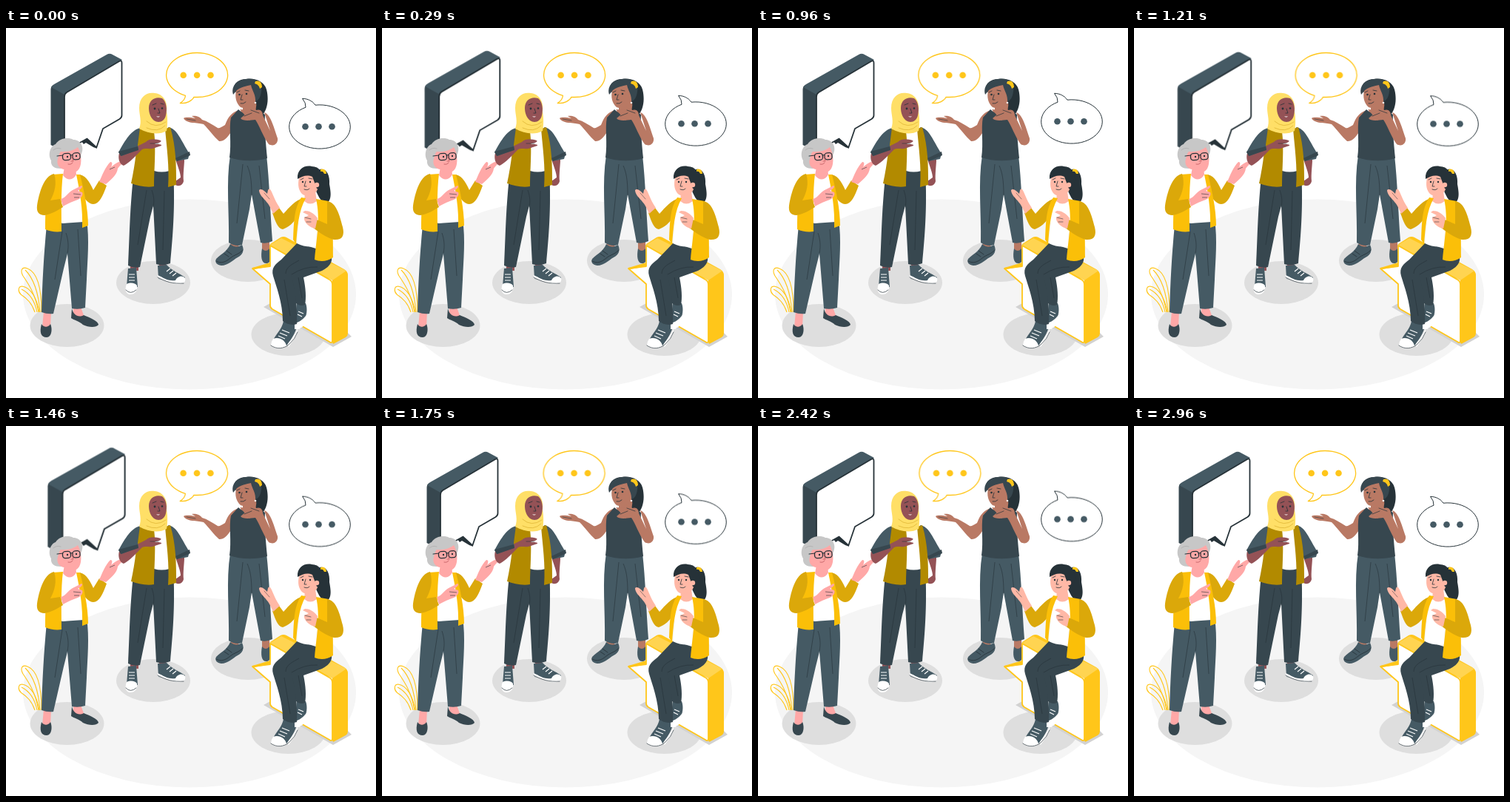
An HTML page that plays this animation: 500x500 px, repeating every 3 s.

```html
<!DOCTYPE html>
<html lang="en">
<head>
<meta charset="utf-8">
<title>Four women talking</title>
<style>
html, body { margin: 0; width: 100%; height: 100%; overflow: hidden; background: #fff; }
svg { display: block; width: 100%; height: 100%; }
.ink { fill: #263238; }
.navy { fill: #37474f; }
.slate { fill: #455a64; }
.sun { fill: #ffc61a; }
.amber { fill: #fbbf08; }
.gold { fill: #dba80a; }
.olive { fill: #b28a00; }
.white { fill: #fff; }
.pink { fill: #ffa8a7; }
.peach { fill: #ffb8a6; }
.umber { fill: #945256; }
.tan { fill: #b97964; }
.floor { fill: #f5f5f5; }
.shade { fill: #dedede; }
.line { fill: none; stroke: #263238; stroke-width: 1; stroke-linecap: round; stroke-linejoin: round; }
.lace { fill: none; stroke: #fff; stroke-width: 1.2; }
.fold { fill: none; stroke: #263238; stroke-width: .8; opacity: .75; }
.rim { fill: #fff; stroke: #ffc61a; stroke-width: 1.3; stroke-linejoin: round; }

.pulse { transform-origin: 109px 98.5px; animation: pulse 3s linear infinite; }
.shake { animation: shake 1.5s linear infinite; }
.float { animation: float 1.5s linear infinite; }
@keyframes pulse {
  0%, 25%, 35%, 59%, 100% { transform: scale(1); }
  16.67% { transform: scale(1.1); }
  50% { transform: scale(1.09); }
}
@keyframes shake {
  0%, 100% { transform: translateX(0); }
  10%, 90% { transform: translateX(-1px); }
  20%, 80% { transform: translateX(2px); }
  30%, 50%, 70% { transform: translateX(-4px); }
  40%, 60% { transform: translateX(4px); }
}
@keyframes float {
  0%, 100% { transform: translateY(0); }
  50% { transform: translateY(-10px); }
}
</style>
</head>
<body>
<svg viewBox="0 0 500 500">
  <ellipse class="floor" cx="248" cy="360" rx="225" ry="128.500"/>
  <g class="shade">
    <ellipse cx="82.500" cy="402" rx="50" ry="29"/>
    <ellipse cx="199" cy="344" rx="50" ry="29"/>
    <ellipse cx="327" cy="314.500" rx="50" ry="28.500"/>
    <ellipse cx="381.500" cy="414" rx="50" ry="29"/>
  </g>

  <!-- plant -->
  <g class="rim" style="fill:none;stroke-width:1.1">
    <path d="M48 384C48 360 45 331 29 325C21 322 19 328 23 335C31 347 39 358 44 384M26 327C38 339 44 359 46 384"/>
    <path d="M45 384C42 366 34 351 22 349C16 349 16 356 20 360C29 366 35 372 39 384M21 353C33 359 39 369 42 384"/>
  </g>

  <!-- big speech bubble -->
  <g class="pulse">
    <path class="navy" d="M60.500 83Q60.500 79 64 77L79 87V168L60.500 158Z"/>
    <path class="slate" d="M61 80Q62 78 65 76L136 36Q140 33.500 144 36L157 43L79 90Z"/>
    <path class="ink" d="M102 153L110 149L123 158L122 162.500L118 161L108 155L105 157Z"/>
    <path class="white" d="M79 93Q79 89 82 87L153 45Q156.500 43 156.500 47V118Q156.500 121 153.500 123L131 136L122.300 161.500L109.500 149.500L82 165Q79 167 79 163Z" stroke="#263238" stroke-width="1.800"/>
  </g>

  <!-- yellow round bubble -->
  <g class="shake">
    <path class="rim" d="M253.900 93.350C252 98 244 102.500 235.300 101.500Q242 97.500 242.500 91.300A41.500 30 0 1 1 253.900 93.350Z"/>
    <g class="sun"><circle cx="239.700" cy="63.800" r="4.300"/><circle cx="258.100" cy="63.800" r="4.300"/><circle cx="276.500" cy="63.800" r="4.300"/></g>
  </g>

  <!-- dark round bubble -->
  <g class="float">
    <path class="white" d="M405 107.200Q405.500 101 400.500 95.300C408 95.500 414 98.500 418 104.200A41.300 29.600 0 1 1 405 107.200Z" stroke="#263238"/>
    <g class="slate"><circle cx="404.500" cy="133.300" r="4.300"/><circle cx="422.500" cy="133.300" r="4.300"/><circle cx="440.500" cy="133.300" r="4.300"/></g>
  </g>

  <!-- older woman -->
  <g>
    <path class="pink" d="M51 382H61L60 405H49ZM91 377H101L106 391H91Z"/>
    <path class="navy" d="M48 400C51 405 57 405 60 400C63 406 62 418 55 418C47 418 45 411 48 400ZM89 379C91 388 98 392 105 388C112 391 125 396 125 401C122 405 112 405 104 401C99 396 92 395 88 392Z"/>
    <path class="slate" d="M55 266L109 260C113 285 110 315 109 340L107 378Q98 381 89 379L83 305L78 325L64 386Q56 387 48 384C49 346 51 307 55 266Z"/>
    <path class="fold" d="M83 304C85 294 84 286 81 277M76 275L66 340M97 272L101 335"/>
    <path class="white" d="M74 200C83 205 93 204 99 198L105 262L76 264Z"/>
    <path class="pink" d="M79 188L77 199C83 207 91 206 95 198L94 188Z"/>
    <path class="gold" d="M97 198C107 198 112 206 118 219L126 206L136 213C131 227 126 238 118 238C112 238 105 230 102 224Z"/>
    <path class="pink" d="M126 208C130 199 134 188 141 181C145 181 143 186 142 188C147 184 152 180 156 181C158 183 153 187 151 190C150 198 144 203 135 211Z"/>
    <path class="fold" d="M140 191L147 188"/>
    <path class="amber" d="M63 198L77 197C74 220 75 250 75 275C68 276 59 275 53 272C53 246 54 224 59 210ZM95 198L100 198C105 218 111 244 111 267L103 270C104 245 100 222 95 198Z"/>
    <path class="gold" d="M65 197C51 200 45 222 42 240C41 248 44 253 52 253C62 251 69 247 77 242L73 231L60 233C66 222 69 210 65 197Z"/>
    <path class="pink" d="M74 231C81 230 84 221 92 218L102 213C105 214 101 218 97 220L103 222C105 226 101 230 97 232C91 234 84 237 77 241Z"/>
    <path class="fold" d="M91 224L101 225M92 229L99 229"/>
    <path d="M61 179C56 171 60 159 67 157C72 149 84 147 91 151C101 151 106 161 102 170L98 178L74 190C66 190 60 187 61 179Z" fill="#c7c7c7"/>
    <path class="pink" d="M70 177C71 173 72 169 74 167C84 168 92 165 97 161C102 169 103 183 99 190C95 197 86 197 80 191C75 192 67 186 70 177Z"/>
    <path class="line" d="M69 173L77 172M87 172L90 171.500" stroke-width="1.500"/>
    <rect class="line" x="76.500" y="169.500" width="11" height="9" rx="3.500" transform="rotate(-4 82 174)" style="stroke-width:1.300"/>
    <rect class="line" x="90" y="168.800" width="10" height="9" rx="3.500" transform="rotate(-4 95 173)" style="stroke-width:1.300"/>
    <g class="ink"><circle cx="83" cy="174" r="1.200"/><circle cx="95" cy="173" r="1.200"/></g>
    <path class="line" d="M84 184Q88 185 90 182M89 173L91 180L88 180" style="stroke:#b9565c;stroke-width:.8"/>
    <path class="line" d="M64 165Q68 161 74 163" style="stroke:#a9a9a9;stroke-width:.7"/>
  </g>

  <!-- woman with headscarf -->
  <g>
    <path class="umber" d="M168 318H179V328H168ZM207 316H216V324H207Z"/>
    <path class="slate" d="M165 325L176 324L178 350L163 349ZM205 321L217 320C224 328 235 332 242 337L240 343L206 339Z"/>
    <path class="white" d="M163 346C169 343 175 345 177 348C178 356 174 360 168 360C162 360 160 353 163 346ZM205 334C214 338 222 344 229 341C231 336 238 333 242 338C244 345 236 347 230 346C221 344 212 340 205 338Z"/>
    <path class="lace" d="M166 333H174M166 337H174M166 341H174M217 329L222 325M221 332L226 328M225 335L230 331"/>
    <path class="line" d="M162 354Q168 361 176 354M205 337C216 343 226 346 240 345" style="stroke-width:.7"/>
    <path class="navy" d="M173 192L226 192C229 244 225 284 222 318Q212 322 203 319L199 240L195 255L181 323Q173 325 165 321C167 283 167 245 173 192Z"/>
    <path class="fold" d="M199 242C201 232 199 225 197 219M190 219L178 293M214 220L212 300"/>
    <path class="umber" d="M229 177C232 187 236 196 236 202L229 207L229 212C234 215 239 212 240 207C239 198 241 185 241 178Z"/>
    <path class="slate" d="M219 134C231 135 237 153 248 170L246 177L230 180L223 160Z"/>
    <path class="navy" d="M229 176L248 167L249 172L231 180Z"/>
    <path class="white" d="M195 138L218 137L221 193Q210 196 200 193Z"/>
    <path class="olive" d="M179 136L200 139C203 164 200 191 200 214C190 216 178 213 169 210C175 183 177 159 179 136ZM215 136L222 134C230 161 230 187 230 212L219 215C221 187 217 161 215 136Z"/>
    <path class="umber" d="M153 169L175 161L189 154C194 149 203 150 209 152C212 154 203 156 200 157C206 157 211 157 210 159L198 163C192 164 188 162 184 164C176 172 167 182 159 186C153 184 151 176 153 169Z"/>
    <path class="slate" d="M181 135C167 139 159 156 152 168L156 173L179 164L178 158Z"/>
    <path class="navy" d="M152 167L178 160L179 165L155 173Z"/>
    <path class="line" d="M195 156L206 156" style="stroke-width:.6"/>
    <path d="M180 108C180 93 190 86 201 88C212 89 219 99 217 113C219 124 218 135 217 139C207 145 192 143 180 136C184 126 180 118 180 108Z" fill="#ffdf67"/>
    <path class="umber" d="M193 108C193 97 202 92 211 95C217 100 218 110 216 118C214 127 206 129 200 125C195 121 193 114 193 108Z"/>
    <path class="line" d="M190 126Q202 137 216 127M190 135Q205 142 215 132" style="stroke:#dfb736;stroke-width:.8"/>
    <g class="ink"><circle cx="201" cy="109" r="1.400"/><circle cx="211" cy="108.500" r="1.300"/></g>
    <path class="line" d="M198 104L203 102M209 102L213 103M206 109L208 115L205 115" style="stroke-width:.8"/>
    <path d="M203 119.500Q206 121.500 208 119.500Z" fill="#fff"/>
  </g>

  <!-- woman with raised palm -->
  <g>
    <path class="tan" d="M304 288H315L314 299H303ZM346 286H356V303H346Z"/>
    <path class="slate" d="M303 292C309 297 314 296 319 293C323 301 319 307 313 310C306 314 300 321 291 321C284 320 282 316 284 312C291 305 299 302 303 292ZM346 298C349 302 353 302 356 298C359 309 358 317 353 318C345 319 344 309 346 298Z"/>
    <path class="line" d="M284 315C291 319 297 316 303 311C309 306 315 306 320 300M298 301L305 306M295 305L301 309" style="stroke-width:.8"/>
    <path class="slate" d="M303 172L352 172C356 207 357 248 360 288Q352 292 344 290L332 225L329 245L319 293Q310 296 301 290C302 250 297 209 303 172Z"/>
    <path class="fold" d="M332 226C332 205 330 195 326 186M320 184L312 264M342 186L350 258"/>
    <path class="tan" d="M315 111C304 114 300 121 296 131C291 134 288 136 286 135C278 130 272 126 265 124C262 119 255 118 251 119L256 122C249 121 243 120 240 122C242 126 249 128 254 128C259 129 264 129 267 130C275 138 281 147 288 153C297 154 302 143 309 134Z"/>
    <path class="line" d="M244 123L256 125" style="stroke-width:.6"/>
    <path class="ink" d="M308 84C306 76 314 69 324 69C336 67 349 72 352 83C356 99 352 111 347 117C339 117 331 112 329 105Z"/>
    <path class="tan" d="M320 102H336V112L345 115L337 127L312 115L320 111Z"/>
    <path class="navy" d="M314 110C322 118 330 119 341 111L350 117C349 134 351 155 353 176C337 181 316 180 302 175C305 156 301 135 304 121Z"/>
    <path class="tan" d="M316 110L343 112L329 125Z"/>
    <path class="tan" d="M349 114C358 117 362 135 367 149C368 156 362 161 355 157C347 146 342 131 337 124C329 125 320 126 317 122L329 112C332 107 334 101 338 102C339 105 337 109 338 111C344 109 347 113 347 118L357 139Z"/>
    <path class="navy" d="M307 90C303 78 314 69 326 69C339 67 347 75 345 86C344 94 341 98 337 99L329 84L312 84Z"/>
    <path class="tan" d="M311 85C316 80 326 78 331 77C333 86 338 90 337 101C333 108 324 110 317 107C311 102 309 93 311 85Z"/>
    <path class="sun" d="M337 72C342 70 346 73 346 80L343 82C342 78 340 76 336 75Z"/>
    <g class="ink"><circle cx="315.500" cy="90" r="1.300"/><circle cx="325" cy="89" r="1.300"/></g>
    <path class="line" d="M312 87L316 85M323 84L328 85M319 90L317 97L320 97M317 102Q321 103 324 100" style="stroke-width:.8"/>
    <path class="line" d="M331 111L342 115M322 119L332 115" style="stroke-width:.7"/>
    <circle class="white" cx="337" cy="101" r="1.300"/>
  </g>

  <!-- seat -->
  <g>
    <path d="M348 377L357 372L441 420L461 411L467 417L442 431Z" fill="#d2d2d2"/>
    <path class="sun" d="M357 292L371 283Q375 281 379 283L457 326Q462 329 462 334V413Q462 416 459 418L444 426Q441 428 441 424V340L357 316Z"/>
    <path class="rim" d="M357 294L437 340Q441 342 441 347V422Q441 427 437 424L360 380Q357 378 357 375V346L333 325L357 322Z" style="stroke-width:1.800"/>
    <path class="sun" d="M333 324L357 317V322L336 326Z"/>
    <path d="M357 293L372 284L460 328L441 341Z" fill="#ffd451"/>
  </g>

  <!-- seated woman -->
  <g>
    <path class="slate" d="M393 370L405 372C408 380 406 389 403 396L398 406H390ZM375 396L393 399C394 410 385 418 383 428L369 430L360 423C366 412 373 407 375 396Z"/>
    <path class="white" d="M390 399C396 398 402 393 406 388C408 395 404 403 396 407L390 407ZM361 420C369 417 378 422 379 430C374 435 362 434 358 429Q358 424 361 420ZM380 428C386 419 391 414 394 406L394 410C393 417 386 424 382 431Z"/>
    <path class="lace" d="M395 383L402 386M394 387L400 390M373 408L383 412M370 412L380 416M368 416L377 420"/>
    <path class="line" d="M358 429C366 435 376 433 382 428Q391 420 394 411" style="stroke-width:.7"/>
    <path class="navy" d="M396 291L438 304C444 315 437 323 427 328L402 337C405 351 406 365 404 374Q397 377 391 371L383 335Z"/>
    <path class="navy" d="M394 290L438 307C440 318 430 323 419 324L385 333C391 353 394 377 393 400Q383 403 374 396C374 371 365 349 361 335C358 324 364 319 372 313Z"/>
    <path class="fold" d="M386 333Q403 322 421 323M378 332C378 323 387 319 396 314M376 340L384 389M395 337L400 365"/>
    <path class="ink" d="M424 191C433 189 438 199 437 211C439 222 441 233 432 238C425 234 421 226 417 215Z"/>
    <path class="white" d="M399 229L421 233L419 295Q405 297 393 291Z"/>
    <path class="peach" d="M404 222L418 221L420 234Q411 241 403 234Z"/>
    <path class="gold" d="M401 230C391 233 383 242 375 251L369 243L360 250C364 261 367 271 374 272C382 269 389 263 394 255Z"/>
    <path class="peach" d="M361 251C357 242 355 238 352 235C348 230 342 225 342 219C345 216 350 221 353 224C354 220 354 216 357 218C361 224 362 231 370 243Z"/>
    <path class="line" d="M349 223L356 231" style="stroke-width:.5"/>
    <path class="amber" d="M399 229L405 230C395 248 394 269 392 292L388 286C389 263 389 244 399 229ZM419 231L436 234C442 247 442 283 442 310C434 316 424 316 417 313C420 281 425 258 419 231Z"/>
    <path class="gold" d="M434 234C446 235 451 253 455 269C458 281 454 287 443 286C433 283 421 275 414 269L420 259L434 265Z"/>
    <path class="peach" d="M421 257C416 250 410 247 404 247L401 249L409 253L403 256C402 262 409 268 414 270L418 271Z"/>
    <path class="line" d="M404 256L412 258M406 262L412 262" style="stroke-width:.6"/>
    <path class="peach" d="M396 203C397 195 406 192 417 196C422 207 425 212 421 218C418 226 408 229 401 225C395 220 394 211 396 203Z"/>
    <path class="ink" d="M394 204C393 191 403 185 413 187C424 187 429 196 428 208C427 215 424 219 420 217L414 201C407 198 401 200 394 204Z"/>
    <path class="sun" d="M425 191C430 189 433 193 433 197L430 197C429 195 428 193 425 194Z"/>
    <g class="ink"><circle cx="401" cy="208" r="1.200"/><circle cx="411" cy="208" r="1.200"/></g>
    <path class="line" d="M398 205L402 203M409 203L414 204M405 207L403 214L406 214M403 218Q408 220 410 217" style="stroke-width:.8"/>
    <circle class="peach" cx="420" cy="212" r="3.200"/>
  </g>
</svg>
<script>
const LOOP = 3000, FRAMES = 72;
const moves = document.getAnimations();
moves.forEach(m => m.pause());

// Motion advances in even steps; the last one lands on the end of the loop.
function draw(time) {
  const frame = Math.floor((time + 4) * FRAMES / LOOP) % FRAMES;
  moves.forEach(m => { m.currentTime = frame * LOOP / (FRAMES - 1); });
}

const start = performance.now();
function tick() {
  draw(performance.now() - start);
  requestAnimationFrame(tick);
}
tick();
</script>
</body>
</html>
```
